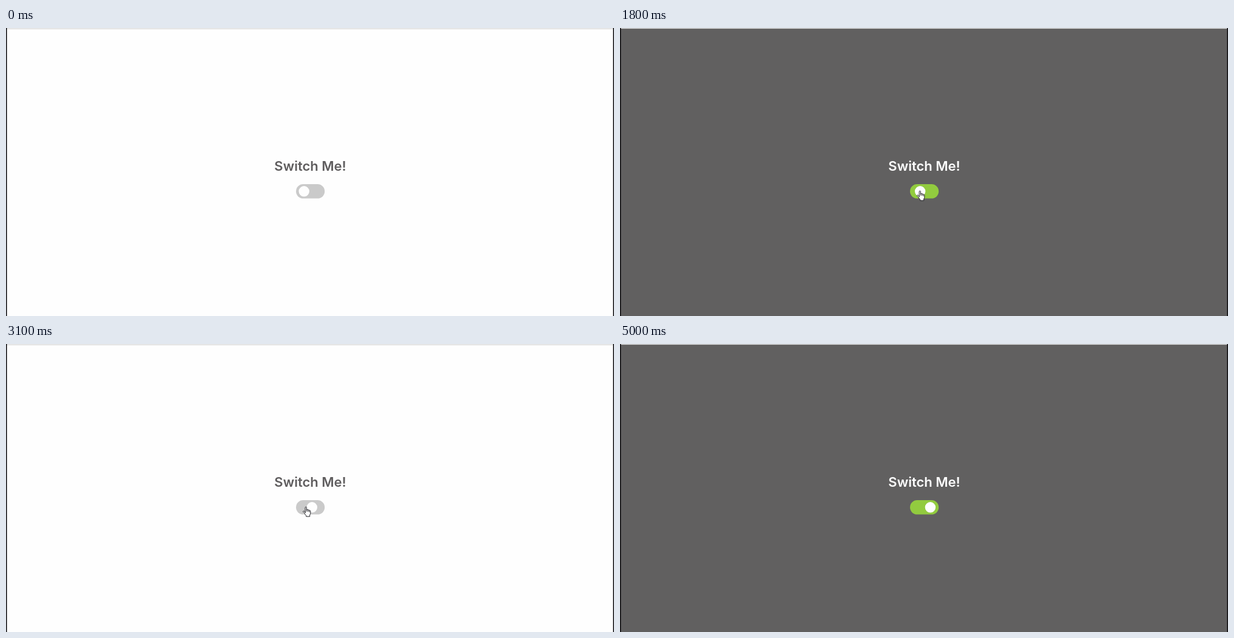
Recreate the animation shown at these times as an HTML page with a canvas. Size 1000 by 474 pixels, loop 5.4 s.

```html
<!DOCTYPE html>
<html lang="en">
<head>
<meta charset="utf-8">
<title>Switch Me!</title>
<style>
  html, body { margin: 0; width: 100%; height: 100%; overflow: hidden; background: #fefefe; }
  canvas { display: block; width: 1000px; height: 474px; }
</style>
</head>
<body>
<canvas id="stage" width="1000" height="474"></canvas>
<script>
const ctx = document.getElementById('stage').getContext('2d');
const W = 1000, H = 474, LOOP = 5400, STEP = 100;
const SLIDE = 400, OFF_X = 490.2, ON_X = 510.4;

const LIGHT = { page: '#fefefe', text: '#5f5d5e', track: '#cacaca', edge: ['#f0f0f0', '#d8d8d8'] };
const DARK = { page: '#616060', text: '#fefefe', track: '#92cb3f', edge: ['#e4e4e4', '#6c6b6b'] };

// Moments at which the switch is pressed
const presses = [
  { at: 1743, on: true },
  { at: 3010, on: false },
  { at: 4142, on: true }
];

const REST = { x: 493.3, y: 267.8 };
const ENTRY = { x: 690, y: 470 };
const EXIT = { x: 800, y: 480 };

const hand = new Path2D('M5.5 13.5V2Q5.5 .5 7 .5T8.5 2V7Q9 6 10.5 6.2T11.5 7.5' +
  'Q12.5 6.6 13.7 7.2T14.5 8.5Q15.6 7.8 16.5 8.6T17 10.5V14Q17 16 15.5 18V21.5' +
  'H7.5V19.5Q5.5 17.5 4 14.5L1 11.5Q.3 10 1.6 9.5T5.5 12.5Z');
const arrow = new Path2D('M.5 .5V16.5L4.2 13L6.6 18.6L9.2 17.5L6.8 12H11.8Z');

const clamp = v => Math.min(1, Math.max(0, v));
const mix = (a, b, p) => a + (b - a) * p;
const bezier = (a, b, s) => 3 * a * s * (1 - s) ** 2 + 3 * b * s * s * (1 - s) + s ** 3;

// The CSS "ease" curve
function ease(p) {
  let lo = 0, hi = 1;
  for (let i = 0; i < 24; i++) {
    const mid = (lo + hi) / 2;
    if (bezier(0.25, 0.25, mid) < p) lo = mid; else hi = mid;
  }
  return bezier(0.1, 1, lo);
}

function switchAt(t) {
  const last = presses.filter(p => p.at <= t).pop();
  if (!last) return { on: false, x: OFF_X };
  const p = ease(clamp((t - last.at) / SLIDE));
  return { on: last.on, x: last.on ? mix(OFF_X, ON_X, p) : mix(ON_X, OFF_X, p) };
}

function pointerAt(t) {
  if (t < 300 || t >= 5000) return null;
  const leaving = t >= 4700;
  const far = leaving ? EXIT : ENTRY;
  const p = leaving ? ((t - 4600) / 400) ** 1.5 : (1 - clamp((t - 200) / 1100)) ** 2;
  return { x: mix(REST.x, far.x, p), y: mix(REST.y, far.y, p) };
}

function rect(color, x, y, w, h) {
  ctx.fillStyle = color;
  ctx.fillRect(x, y, w, h);
}

function drawPointer({ x, y }) {
  const over = x > 477 && x < 524 && y > 257 && y < 281;
  const shape = over ? hand : arrow;
  ctx.save();
  ctx.translate(x, y);
  ctx.scale(0.75, 0.75);
  if (over) ctx.translate(-7, 0);
  ctx.lineWidth = 1.3;
  ctx.lineJoin = 'round';
  ctx.fillStyle = '#fff';
  ctx.strokeStyle = '#17171c';
  ctx.fill(shape);
  ctx.stroke(shape);
  if (over) {
    ctx.beginPath();
    for (const [lx, top] of [[8.5, 7], [11.5, 7.5], [14.5, 8.5]]) {
      ctx.moveTo(lx, top);
      ctx.lineTo(lx, top + 3.5);
    }
    ctx.stroke();
  }
  ctx.restore();
}

function draw(t) {
  const { on, x } = switchAt(t);
  const theme = on ? DARK : LIGHT;

  rect(theme.page, 0, 0, W, H);
  theme.edge.forEach((color, y) => rect(color, 0, y, W, 1));
  rect('#0c0b0e', 0, 0, 1.5, H);
  rect('#0c0b0e', W - 1.5, 0, 1.5, H);

  ctx.fillStyle = theme.text;
  ctx.font = '600 22px Inter, sans-serif';
  ctx.textAlign = 'center';
  ctx.fillText('Switch Me!', 500.5, 234.8);

  ctx.fillStyle = theme.track;
  ctx.beginPath();
  ctx.roundRect(477, 257, 47.2, 23.6, 11.8);
  ctx.fill();

  ctx.fillStyle = '#fefefe';
  ctx.beginPath();
  ctx.arc(x, 268.8, 8.7, 0, Math.PI * 2);
  ctx.fill();

  const pointer = pointerAt(t);
  if (pointer) drawPointer(pointer);
}

function tick() {
  const t = performance.now() % LOOP;
  draw(Math.floor(t / STEP) * STEP);
  requestAnimationFrame(tick);
}
tick();
</script>
</body>
</html>
```
